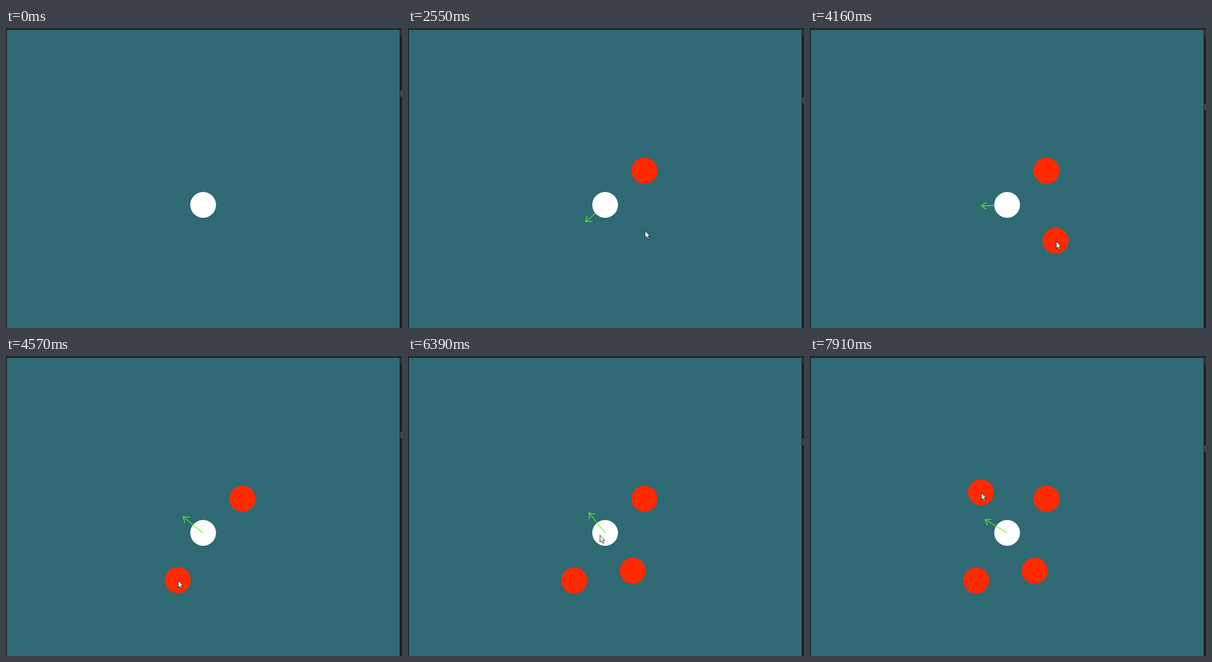
Write an HTML page with a canvas that moves like this. It is 861 px wide and 650 px high and loops after 7.99 s.

```html
<!DOCTYPE html>
<html lang="en">
<head>
<meta charset="utf-8">
<title>Avoidance steering</title>
<style>
  html, body { margin: 0; width: 100%; height: 100%; overflow: hidden; background: #2f6974; }
  canvas { display: block; }
</style>
</head>
<body>
<canvas id="stage" width="861" height="650"></canvas>
<script>
const ctx = document.getElementById('stage').getContext('2d');
const LOOP = 7990, STEP = 75, REACH = 56;
const AGENT = { x: 428.6, y: 383.3, radius: 28 };
const ENTRY = { start: 590, x: 850, y: 190 };

// The mouse eases to each point and rests there until the next move
const move = (start, end, x, y) => ({ start, end, x, y });
const MOVES = [
  move(590, 1050, 332.5, 284),
  move(1050, 1365, 412, 286.5),
  move(1365, 1600, 416.3, 287),
  move(1600, 1920, 514.7, 309.8),
  move(2255, 2550, 514.7, 439),
  move(2550, 3030, 534.5, 459.5),
  move(3695, 4160, 534.6, 461.6),
  move(4160, 4570, 373.9, 486),
  move(4570, 4720, 362, 487),
  move(5225, 5835, 489, 466),
  move(6315, 6390, 417, 388),
  move(6390, 6950, 342.5, 276.5),
  move(7435, 7590, 344, 279),
  move(7685, 7910, 372.2, 296)
];

// Each obstacle appears under the mouse and follows it until dropped
const OBSTACLES = [
  { spawn: 1050, drop: 1995 },
  { spawn: 3260, drop: 4800 },
  { spawn: 5910, drop: 6000 },
  { spawn: 7030, drop: LOOP }
];

const smooth = p => p * p * (3 - 2 * p);

function mouseAt(t) {
  const i = MOVES.findLastIndex(m => m.start <= t);
  const to = MOVES[i], from = MOVES[i - 1] || ENTRY;
  const elapsed = Math.floor((t - to.start) / STEP) * STEP;
  const k = smooth(Math.min(1, elapsed / (to.end - to.start)));
  return { x: from.x + (to.x - from.x) * k, y: from.y + (to.y - from.y) * k };
}

function obstacleAt({ drop }, t) {
  const p = mouseAt(Math.min(t, drop));
  return { x: p.x - 0.6, y: p.y - 0.5, radius: 28.3 };
}

function box(x, y, w, h, color) {
  ctx.fillStyle = color;
  ctx.fillRect(x, y, w, h);
}

function disc({ x, y, radius }, color) {
  ctx.fillStyle = color;
  ctx.beginPath();
  ctx.arc(x, y, radius, 0, Math.PI * 2);
  ctx.fill();
}

function drawWindow(selected) {
  box(0, 0, 861, 650, '#2f6974');
  box(0, 0, 861, 3, '#2b2b2b');
  for (const x of [84, 162, 309, 609, 710, 733, 757, 793]) box(x, 0, 1, 3, '#191919');
  box(0, 3, 861, 1, '#141c1e');
  box(0, 3, 2, 647, '#182326');
  box(856, 3, 5, 647, '#111');
  box(857, 4, 4, 646, '#1f1f1f');
  box(857, 4, 4, 13, '#333');
  box(857, Math.round(135 + 14.5 * selected), 4, 14, '#444');
}

function drawArrow(angle) {
  const tip = { x: AGENT.x + REACH * Math.cos(angle), y: AGENT.y + REACH * Math.sin(angle) };
  const barb = turn => [tip.x - 14 * Math.cos(angle + turn), tip.y - 14 * Math.sin(angle + turn)];
  ctx.strokeStyle = '#5f0';
  ctx.lineWidth = 1.5;
  ctx.beginPath();
  ctx.moveTo(AGENT.x, AGENT.y);
  ctx.lineTo(tip.x, tip.y);
  ctx.moveTo(...barb(0.61));
  ctx.lineTo(tip.x, tip.y);
  ctx.lineTo(...barb(-0.61));
  ctx.stroke();
}

const pointer = new Path2D('M0 0V15L3.5 12L6 17.5L8.5 16.5L6 11H10.5Z');
function drawMouse({ x, y }) {
  ctx.save();
  ctx.translate(Math.round(x) + 0.5, Math.round(y) + 0.5);
  ctx.fillStyle = '#fff';
  ctx.strokeStyle = '#111';
  ctx.lineWidth = 1;
  ctx.fill(pointer);
  ctx.stroke(pointer);
  ctx.restore();
}

function draw(t) {
  const obstacles = OBSTACLES.filter(o => t >= o.spawn).map(o => obstacleAt(o, t));
  drawWindow(obstacles.length);

  // Steer along the sum of unit vectors pointing away from every obstacle
  let dx = 0, dy = 0;
  for (const o of obstacles) {
    const d = Math.hypot(AGENT.x - o.x, AGENT.y - o.y);
    dx += (AGENT.x - o.x) / d;
    dy += (AGENT.y - o.y) / d;
    disc(o, '#ff2a00');
  }
  const angle = Math.atan2(dy, dx);
  if (obstacles.length && dy >= 0) drawArrow(angle);
  disc(AGENT, '#fff');
  if (dy < 0) drawArrow(angle);
  if (t >= ENTRY.start) drawMouse(mouseAt(t));
}

function frame() {
  draw(performance.now() % LOOP);
  requestAnimationFrame(frame);
}
frame();
</script>
</body>
</html>
```
